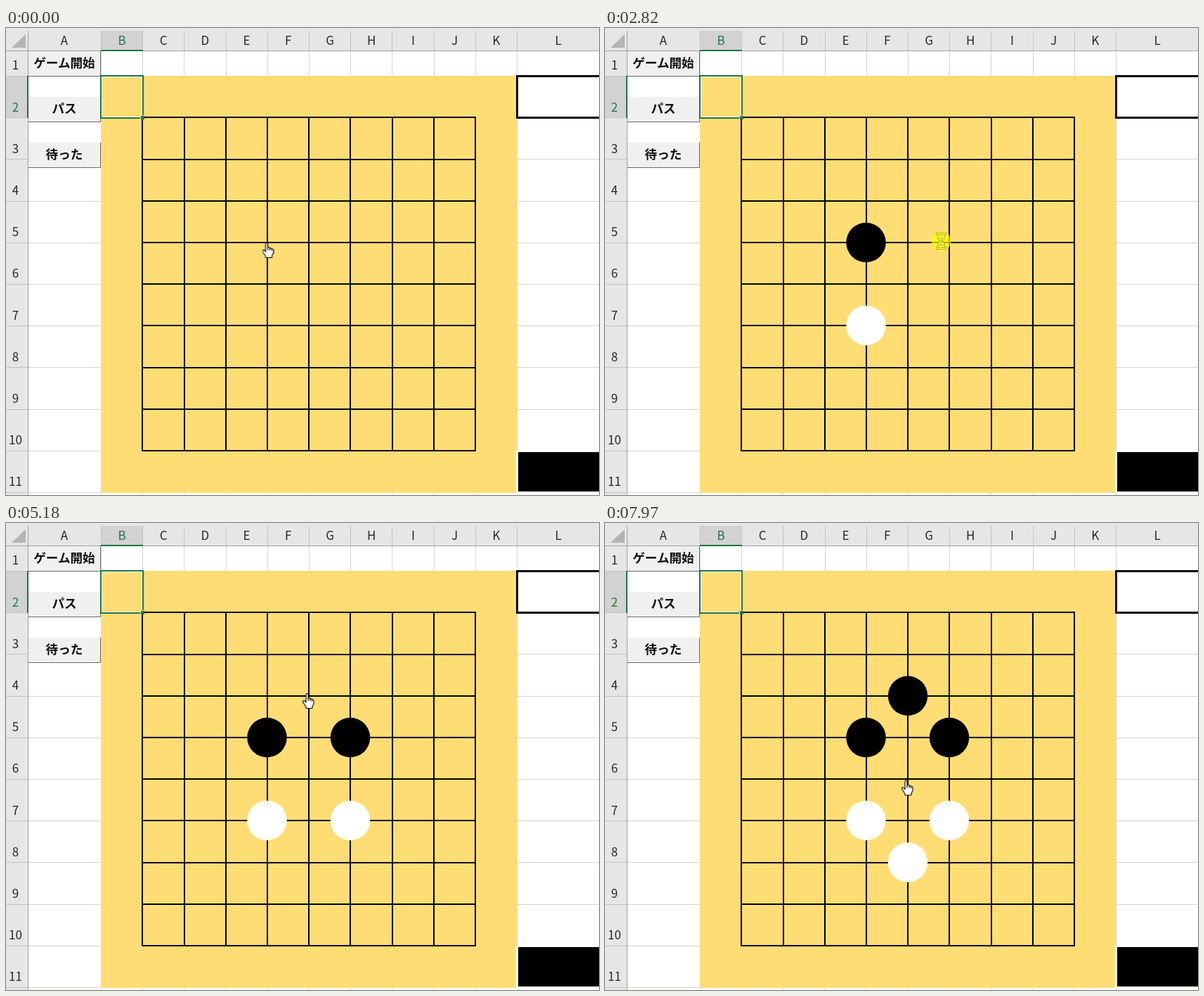
Animation of 844 by 664 pixels, one loop 8 s. Source, as an HTML page:

```html
<!DOCTYPE html>
<html lang="ja">
<head>
<meta charset="utf-8">
<title>Board game sheet</title>
<style>
html, body { margin: 0; width: 100%; height: 100%; overflow: hidden; background: #fff; }
svg { display: block; width: 844px; height: 664px; }
text { font: 17px "Noto Sans CJK JP", "Noto Sans CJK", sans-serif; text-anchor: middle; fill: #262626; }
text.on { fill: #217346; }
text.label { font-size: 17.6px; font-weight: 700; fill: #111; }
.grid rect { shape-rendering: crispEdges; }

.stone, .glow, .hand, .wait { animation: 8s step-end infinite; }
.s1 { animation-name: s1; }
.s2 { animation-name: s2; }
.s3 { animation-name: s3; }
.s4 { animation-name: s4; }
.s5 { animation-name: s5; }
.s6 { animation-name: s6; }
@keyframes s1 { 0% { opacity: 0 } 2.45%, 100% { opacity: 1 } }
@keyframes s2 { 0% { opacity: 0 } 21.45%, 100% { opacity: 1 } }
@keyframes s3 { 0% { opacity: 0 } 36.2%, 100% { opacity: 1 } }
@keyframes s4 { 0% { opacity: 0 } 51.45%, 100% { opacity: 1 } }
@keyframes s5 { 0% { opacity: 0 } 69.3%, 100% { opacity: 1 } }
@keyframes s6 { 0% { opacity: 0 } 90.1%, 100% { opacity: 1 } }

.glow { animation-name: glow; }
@keyframes glow {
  0%, 2.45%, 21.45%, 36.2%, 51.45%, 69.3%, 90.1%, 100% { opacity: 0 }
  1.6%, 19.7%, 35.2%, 50.7%, 68.7%, 89.45% { opacity: .68 }
}
.wait { animation-name: wait; }
@keyframes wait {
  0%, 3.8%, 21.95%, 36.8%, 52.3%, 70.1%, 90.8%, 100% { opacity: 0 }
  2.45%, 21.45%, 35.2%, 51.45%, 69.3%, 90.1% { opacity: 1 }
}
.hand { animation-name: hand; }
@keyframes hand {
  0%, 3.8%, 21.95%, 36.8%, 52.3%, 70.1%, 90.8%, 100% { opacity: 1 }
  2.45%, 21.45%, 35.2%, 51.45%, 69.3%, 90.1% { opacity: 0 }
}
.cursor { animation: move 8s linear infinite; }
@keyframes move {
  0% { transform: translate(371.5px, 305px) }
  8% { transform: translate(371.5px, 305px); animation-timing-function: cubic-bezier(.4, 0, .5, 1) }
  13.2%, 14.2% { transform: translate(378.5px, 412px) }
  15%, 17.3% { transform: translate(377.5px, 415.5px) }
  17.4% { transform: translate(377px, 416.5px) }
  25.5% { transform: translate(377px, 416.5px); animation-timing-function: ease-in-out }
  33.1% { transform: translate(478.5px, 303px) }
  43% { transform: translate(478.5px, 303px); animation-timing-function: ease-in-out }
  49.8% { transform: translate(488.5px, 406.5px) }
  54.2% { transform: translate(489px, 407px); animation-timing-function: ease-in-out }
  64%, 64.7% { transform: translate(430px, 247px) }
  64.74% { transform: translate(429px, 242px) }
  79% { transform: translate(429px, 242px); animation-timing-function: ease-in }
  82.6%, 83.3% { transform: translate(429px, 361px); animation-timing-function: ease-out }
  88.7% { transform: translate(429px, 469px) }
  91.3% { transform: translate(429px, 469px); animation-timing-function: ease-in-out }
  99.5%, 100% { transform: translate(429px, 365.5px) }
}
</style>
</head>
<body>
<svg viewBox="0 0 844 664">
  <g class="grid" id="sheet"></g>
  <path d="M28 9V28H8Z" fill="#b4b4b4"/>
  <g id="labels"></g>

  <circle class="stone s1" cx="371.5" cy="305" r="28.2"/>
  <circle class="stone s2" cx="371.5" cy="423" r="28.2" fill="#fff"/>
  <circle class="stone s3" cx="490" cy="305" r="28.2"/>
  <circle class="stone s4" cx="490" cy="423" r="28.2" fill="#fff"/>
  <circle class="stone s5" cx="431" cy="245.7" r="28.2"/>
  <circle class="stone s6" cx="431" cy="482.5" r="28.2" fill="#fff"/>

  <g class="cursor">
    <g class="hand" stroke="#000" stroke-width="1.1" stroke-linejoin="round">
      <path fill="#fff" d="M-2 2Q-2 .5-.5 .5Q1 .5 1 2V7Q3.5 6.3 4 8Q6 7.3 6.5 9Q9 8.6 9 11V15L7 19V21.5H-2V19.5L-6 13.5Q-7 11.5-5.5 10.7Q-4 10.3-2.8 12.2L-2 13Z"/>
      <path fill="none" d="M1 7V11M4 8V11.3M6.5 9V11.6"/>
    </g>
    <g class="wait" stroke="#111" stroke-width="1.1">
      <path fill="#fff" d="M-5-9V-6Q-5-3-1.3 0Q-5 3-5 6V9H5V6Q5 3 1.3 0Q5-3 5-6V-9Z"/>
      <path fill="#fff" d="M-7-11.5H7V-9H-7ZM-7 9H7V11.5H-7Z"/>
      <path fill="none" d="M-3-5H3M-2-3H2M0-1V3M-3.4 7L0 4L3.4 7"/>
    </g>
    <circle class="glow" r="14" fill="#ff0"/>
  </g>
</svg>
<script>
const NS = 'http://www.w3.org/2000/svg';
const sheet = document.getElementById('sheet');
const labels = document.getElementById('labels');
const CELL = 59.2, GREEN = '#217346', LINE = '#d4d4d4';

function add(parent, tag, attrs) {
  const el = document.createElementNS(NS, tag);
  for (const key in attrs) el.setAttribute(key, attrs[key]);
  return parent.appendChild(el);
}
const box = (x, y, width, height, fill) => add(sheet, 'rect', { x, y, width, height, fill });
const label = (str, x, y, cls = '') => {
  add(labels, 'text', { x, y, class: cls }).textContent = str;
};
const colX = i => Math.round(135 + i * CELL);
const rowY = i => Math.round(68 + i * CELL);

// Cells
box(0, 0, 844, 664, '#fff');
for (let i = 0; i <= 10; i++) {
  box(colX(i), 33, 1, 631, LINE);
  box(32, rowY(i), 812, 1, LINE);
}
box(135, 68, 592, 593, '#ffdd75');

// Headers
box(0, 0, 844, 32, '#e6e6e6');
box(0, 0, 31, 664, '#e6e6e6');
box(135, 4, 59, 28, '#d2d2d2');
box(0, 68, 31, 59, '#d2d2d2');
box(0, 32, 844, 1, '#9f9f9f');
box(31, 4, 1, 660, '#9f9f9f');
for (let i = 0; i <= 10; i++) {
  box(colX(i), 4, 1, 28, '#c3c3c3');
  box(0, rowY(i), 31, 1, '#c3c3c3');
}
box(135, 31, 60, 2, GREEN);
box(30, 68, 2, 60, GREEN);

[...'ABCDEFGHIJKL'].forEach((c, i) => {
  const x = i === 0 ? 83 : i === 11 ? 786 : 165 + (i - 1) * CELL;
  label(c, x, 24, c === 'B' ? 'on' : '');
});
for (let n = 1; n <= 11; n++) {
  label(n, 13.5, n === 1 ? 59 : 118.5 + (n - 2) * CELL, n === 2 ? 'on' : '');
}

// Buttons
[['ゲーム開始', 33], ['パス', 98], ['待った', 163]].forEach(([str, y]) => {
  box(32, y, 103, 35, '#f0f0f0');
  box(134, y, 1, 36, '#696969');
  box(32, y + 35, 103, 1, '#696969');
  label(str, 83, y + 23, 'label');
});

// Board lines
for (let i = 0; i <= 8; i++) {
  box(Math.round(193.3 + i * CELL), 126, 2, 476, '#000');
  box(193, Math.round(126.3 + i * CELL), 475, 2, '#000');
}

// Player cells
box(726, 67, 118, 62, '#000');
box(729, 70, 115, 56, '#fff');
box(726, 601, 118, 60, '#fff');
box(729, 603, 115, 56, '#000');

// Selected cell
box(134, 67, 62, 2, GREEN);
box(134, 67, 2, 62, GREEN);
box(194, 67, 2, 58, GREEN);
box(134, 127, 57, 2, GREEN);
box(136, 69, 58, 1, '#fff');
box(136, 69, 1, 58, '#fff');
box(193, 69, 1, 56, '#fff');
box(136, 126, 56, 1, '#fff');
box(191, 124, 6, 6, '#ffdd75');
box(192, 125, 5, 5, GREEN);
</script>
</body>
</html>
```
